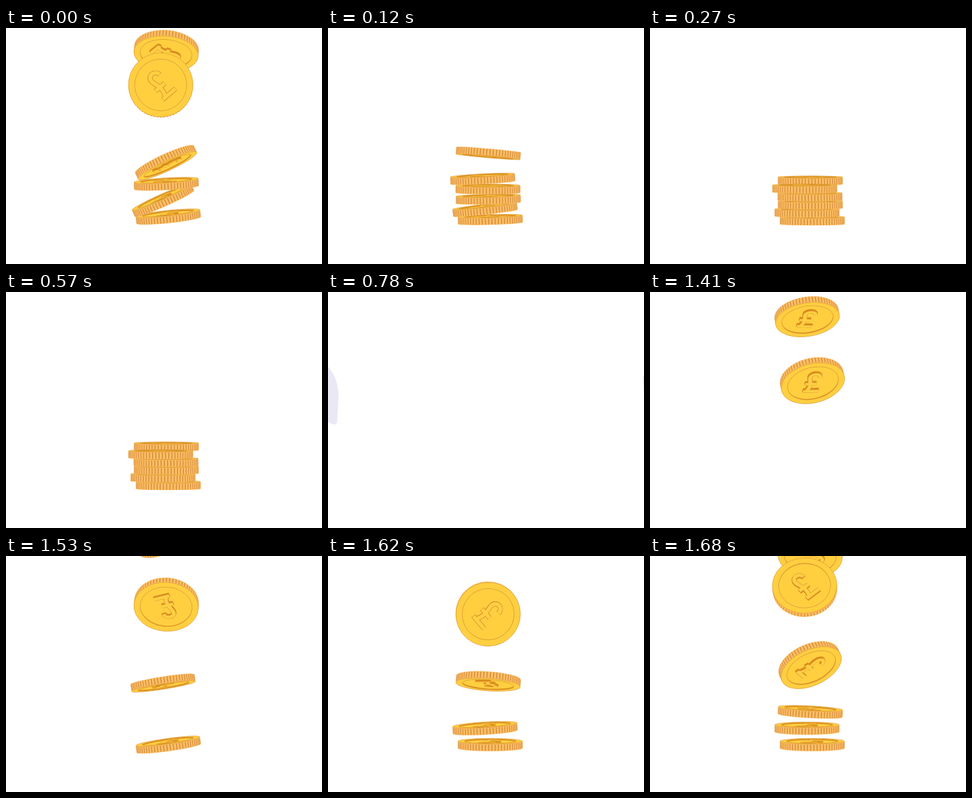
Recreate the animation shown at these times as an HTML page with a canvas. Size 480 by 360 pixels, loop 1.71 s.

```html
<!DOCTYPE html>
<html lang="en">
<head>
<meta charset="utf-8">
<title>Falling coins</title>
<style>
  html, body { margin: 0; width: 100%; height: 100%; overflow: hidden; background: #fff; }
  canvas { display: block; width: 100vw; height: 100vh; }
</style>
</head>
<body>
<canvas id="stage" width="480" height="360"></canvas>
<script>
const ctx = document.getElementById('stage').getContext('2d');

const LOOP = 1710, STEP = 30;
const DROP_START = 1290;          // first coin enters
// The times below count from the first coin.
const JOLT = 405, SETTLE = 420, REST = 690, CLEAR = 990, CLEAR_TIME = 210;
const ENTRY_Y = -21, SPEED = 1.3; // px per ms
const R = 49, RECESS = 39.5, THICK = 11, RIDGES = 62;
const FACE = '#ffcf40', EDGE = '#ffbe61', RIDGE = '#c9843f';
const LINE = '#dc9a3c', SHADE = '#da8b1c', LILAC = '#ebe8f5';
const RAD = Math.PI / 180;

// Bottom coin first. turn: degrees of tumble per px of height;
// sway: roll while falling; jolt: roll when the next coin hits the pile.
const coins = [
  { x: 246.5, delay: 0, spin: 20, sway: -14, jolt: -6 },
  { x: 238.5, delay: 75, spin: 20, turn: 0.17, sway: -9, jolt: -24 },
  { x: 243.5, delay: 167, spin: 157, sway: 4, jolt: -5 },
  { x: 243, delay: 246, spin: 75, turn: 0.63, sway: -25 },
  { x: 235, delay: 337, spin: -38, turn: 0.75, sway: -3 },
  { x: 243.5, delay: 377, spin: 120, turn: 0.23, sway: 5 }
];

const pound = new Path2D(
  'M9 -13 C8 -24 -8 -24 -7 -12 C-6 -4 0 4 -6 18 M-12 19 H13 M-12 2 H6'
);
const puff = new Path2D(
  'M0 -46 Q16 -28 16 0 L14 38 Q12 46 0 38 Q-40 50 -60 20 Q-70 -40 -30 -50 Q-10 -56 0 -46 Z'
);

const lerp = (a, b, p) => a + (b - a) * p;
const progress = (t, start, length) => Math.min(1, Math.max(0, (t - start) / length));
const smooth = p => p * p * (3 - 2 * p);

function poseAt({ delay, turn = 0.33, sway, jolt = 0 }, slot, t) {
  const settle = smooth(progress(t, SETTLE, 180));
  const sink = progress(t, REST, CLEAR - REST);
  const restY = 294 + sink - (12.2 - 0.4 * sink) * slot;
  const pileY = lerp(288 - 25 * slot, restY, settle);
  const y = Math.min(ENTRY_Y + SPEED * (t - delay), pileY);

  const tilt = lerp(85, 88, settle) + turn * Math.max(0, restY - y - 30);
  const swing = 1 - progress(t, delay + 205, 80);
  const knock = t < JOLT ? 0 : 1 - settle;
  return { y, tilt, roll: sway * swing + jolt * knock };
}

function ellipse(y, radius, squash) {
  ctx.beginPath();
  ctx.ellipse(0, y, radius, radius * squash, 0, 0, 2 * Math.PI);
}

function drawEdge(faceY, backY, squash) {
  ctx.fillStyle = EDGE;
  ellipse(backY, R, squash);
  ctx.fill();
  ctx.fillRect(-R, Math.min(faceY, backY), 2 * R, Math.abs(backY - faceY));

  const side = Math.sign(backY - faceY);
  ctx.strokeStyle = RIDGE;
  for (let i = 0; i <= RIDGES / 2; i++) {
    const angle = i * 2 * Math.PI / RIDGES;
    const facing = Math.sin(angle);
    const x = R * Math.cos(angle);
    const bulge = side * R * squash * facing;
    ctx.lineWidth = 0.2 + 1.1 * facing;
    ctx.beginPath();
    ctx.moveTo(x, faceY + bulge + side);
    ctx.lineTo(x, backY + bulge - side * 0.5);
    ctx.stroke();
  }
}

function drawPound(y, squash, spin, color, width) {
  ctx.save();
  ctx.translate(0, y);
  ctx.scale(1, squash);
  ctx.rotate(spin * RAD);
  ctx.strokeStyle = color;
  ctx.lineWidth = width;
  ctx.stroke(pound);
  ctx.restore();
}

function drawFace(y, depth, squash, spin) {
  ctx.fillStyle = FACE;
  ctx.strokeStyle = LINE;
  ctx.lineWidth = 0.7;
  ellipse(y, R, squash);
  ctx.fill();
  ctx.stroke();

  ctx.save();
  ellipse(y, RECESS, squash);
  ctx.fillStyle = SHADE;
  ctx.fill();
  ctx.clip();
  ellipse(y + depth / 2, RECESS, squash);
  ctx.fillStyle = FACE;
  ctx.fill();
  for (let k = 4; k > 0; k--) drawPound(y + depth * k / 4, squash, spin, SHADE, 7);
  drawPound(y, squash, spin, LINE, 7);
  drawPound(y, squash, spin, FACE, 5.6);
  ctx.restore();

  ellipse(y, RECESS, squash);
  ctx.stroke();
}

function drawCoin(coin, t, drop) {
  const { y, tilt, roll } = poseAt(coin, coins.indexOf(coin), t);
  const cos = Math.cos(tilt * RAD);
  const lean = Math.sin(tilt * RAD) * (cos < 0 ? -1 : 1);
  const squash = Math.max(Math.abs(cos), 0.03);
  const half = lean * THICK / 2;

  ctx.save();
  ctx.translate(coin.x, y + drop);
  ctx.rotate(roll * RAD);
  drawEdge(-half, half, squash);
  drawFace(-half, lean * 3.5, squash, coin.spin);
  ctx.restore();
}

function drawPuff(x, y, sx, sy) {
  ctx.save();
  ctx.translate(x, y);
  ctx.scale(sx, sy);
  ctx.fillStyle = LILAC;
  ctx.fill(puff);
  ctx.restore();
}

function draw(t) {
  ctx.fillStyle = '#fff';
  ctx.fillRect(0, 0, 480, 360);
  const p = progress(t, CLEAR, CLEAR_TIME);

  if (p < 1) {
    // The fifth coin tumbles in front of the last one.
    const [a, b, c, d, e, f] = coins;
    [a, b, c, d, f, e].forEach(coin => drawCoin(coin, t, 190 * p * p));
  }
  if (p > 0) {
    const out = 1 - (1 - p) ** 2;
    const size = lerp(0.3, 1, out);
    drawPuff(lerp(235, 0, out), lerp(285, 160, out), size, size);
    drawPuff(lerp(245, 488, out), lerp(285, 134, out), -0.6 * size, 0.4 * size);
  }
}

function frame() {
  const now = performance.now() % LOOP;
  const t = Math.floor(now / STEP) * STEP;
  draw((t + LOOP - DROP_START) % LOOP);
  requestAnimationFrame(frame);
}
frame();
</script>
</body>
</html>
```
